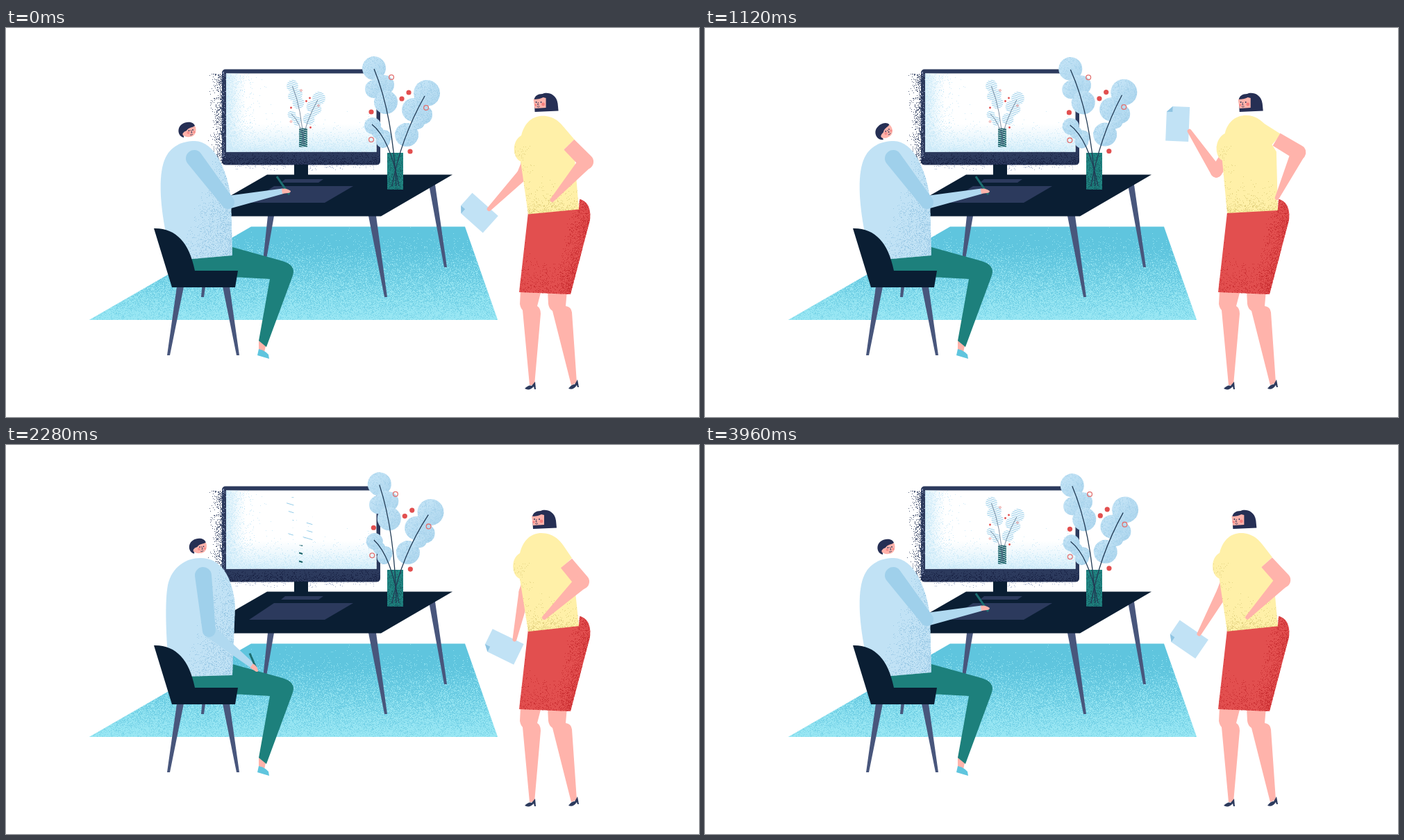
An HTML page with a canvas for the animation above (4000 ms loop, 998 by 561 pixels).

```html
<!DOCTYPE html>
<html lang="en">
<head>
<meta charset="utf-8">
<title>Studio</title>
<style>
html, body { margin: 0; width: 100%; height: 100%; overflow: hidden; background: #fff; }
canvas { display: block; }
</style>
</head>
<body>
<canvas id="stage" width="998" height="561"></canvas>
<script>
const LOOP = 4000;
const ctx = document.getElementById('stage').getContext('2d');
const INK = '#0a1e33', NAVY = '#2c3a5d', LEG = '#48567c', SKIN = '#ffb3ab', TEAL = '#1d807c',
      SKY = '#c1e2f5', SLEEVE = '#9fd0eb', RED = '#e24f4f', HAIR = '#262f54', RUG = '#5fc5de';

// ---------- helpers ----------
const lerp = (a, b, k) => a + (b - a) * k;
const clamp = v => Math.max(0, Math.min(1, v));
const polar = (p, deg, len) => {
  const a = deg * Math.PI / 180;
  return [p[0] + Math.cos(a) * len, p[1] + Math.sin(a) * len];
};
const mix = (a, b, k) => [lerp(a[0], b[0], k), lerp(a[1], b[1], k)];

// Eased value between [time, value] keys.
function keyed(t, ...keys) {
  if (t <= keys[0][0]) return keys[0][1];
  for (let i = 1; i < keys.length; i++) {
    const [t0, v0] = keys[i - 1], [t1, v1] = keys[i];
    if (t < t1) return lerp(v0, v1, (1 - Math.cos(Math.PI * (t - t0) / (t1 - t0))) / 2);
  }
  return keys[keys.length - 1][1];
}

const NUMBER = /-?\d+(\.\d+)?/g;
function morph(a, b, k) {
  const to = b.match(NUMBER);
  let i = 0;
  return new Path2D(a.replace(NUMBER, n => lerp(+n, +to[i++], k).toFixed(2)));
}

function fill(shape, color) {
  ctx.fillStyle = color;
  ctx.fill(typeof shape === 'string' ? new Path2D(shape) : shape);
}

function line(d, color, width) {
  ctx.strokeStyle = color;
  ctx.lineWidth = width;
  ctx.stroke(new Path2D(d));
}

function dot(x, y, r, color) {
  ctx.fillStyle = color;
  ctx.beginPath();
  ctx.arc(x, y, r, 0, 7);
  ctx.fill();
}

function gradient(x0, y0, x1, y1, from, to, begin = 0) {
  const g = ctx.createLinearGradient(x0, y0, x1, y1);
  g.addColorStop(begin, from);
  g.addColorStop(1, to);
  return g;
}

function limb(a, b, ra, rb, color, flatStart) {
  const ang = Math.atan2(b[1] - a[1], b[0] - a[0]), q = Math.PI / 2;
  ctx.beginPath();
  ctx.arc(b[0], b[1], rb, ang - q, ang + q);
  if (flatStart) {
    ctx.lineTo(a[0] + Math.cos(ang + q) * ra, a[1] + Math.sin(ang + q) * ra);
    ctx.lineTo(a[0] + Math.cos(ang - q) * ra, a[1] + Math.sin(ang - q) * ra);
  } else ctx.arc(a[0], a[1], ra, ang + q, ang + 3 * q);
  ctx.fillStyle = color;
  ctx.fill();
}

let seed = 7;
const random = () => (seed = (seed * 16807) % 2147483647) / 2147483647;

// Speckled layer; density receives 0..1 coordinates.
function grain(x, y, w, h, color, density) {
  const image = document.createElement('canvas');
  image.width = w;
  image.height = h;
  const g = image.getContext('2d');
  g.fillStyle = color;
  for (let j = 0; j < h; j++)
    for (let i = 0; i < w; i++)
      if (random() < density(i / w, j / h)) g.fillRect(i, j, 1, 1);
  return { image, x, y };
}

function shade(path, layer, dx = 0) {
  ctx.save();
  ctx.clip(path);
  ctx.drawImage(layer.image, layer.x + dx, layer.y);
  ctx.restore();
}

const grains = {
  rug: grain(120, 286, 590, 136, '#a6eef8b0', (x, y) => .85 * Math.pow(y, 1.7)),
  shirt: grain(215, 160, 122, 180, '#9ccae6', (x, y) => .7 * Math.max(0, x - .5 + (y - .45) * .5)),
  blouse: grain(725, 124, 110, 148, '#dcc976c0', (x, y) => .5 * Math.pow(y, 9) + .3 * clamp(.33 - x) * (y > .3)),
  skirt: grain(738, 245, 106, 140, '#c5282cc0', (x, y) =>
    .9 * clamp((x + y * .25 - .72) * 2) + .5 * clamp(y - .6) + .4 * clamp(.16 - x)),
  shadow: grain(284, 66, 28, 130, '#2c3a5dd0', (x, y) => .6 * Math.pow(x, 3)),
  under: grain(330, 197, 200, 9, '#a3afcb', (x, y) => .12 * (1 - y)),
  chin: grain(311, 179, 228, 18, '#1a2446', (x, y) => .45 * y),
  bezel: grain(311, 60, 6, 130, '#8e9abb', x => .2 * (1 - x)),
  screen: grain(317, 66, 217, 113, '#cdeaf8', (x, y) =>
    clamp(.6 * Math.pow(1 - x, 16) + .6 * Math.pow(y, 8))),
  leaf: grain(505, 35, 125, 140, '#9ccbe7b0', (x, y) => .14 + .2 * y),
  vase: grain(549, 180, 24, 54, '#176468', (x, y) => .35 * y + .15)
};

// ---------- plant ----------
const branches = [
  [[545, 82, 14], [530, 88, 13], [547, 107, 17], [530, 58, 17], [538, 78, 11]],
  [[600, 125, 14], [587, 118, 17], [577, 154, 17], [606, 94, 19], [593, 136, 10]],
  [[545, 157, 10], [535, 150, 9], [543, 163, 10], [528, 141, 12]]
];
const stems = [[530, 59, 557, 125, 562, 228], [603, 98, 568, 160, 556, 228], [527, 139, 553, 160, 566, 228]];
const berries = [[526, 121], [570, 102], [580, 93], [582, 178]];
const rings = [[555, 71], [605, 115], [526, 161]];

function union(circles) {
  const path = new Path2D();
  for (const [x, y, r] of circles) {
    path.moveTo(x + r, y);
    path.arc(x, y, r, 0, 7);
  }
  return path;
}
const leaves = branches.map(union);

function turn(x, y, a) {
  const dx = x - 561, dy = y - 185, c = Math.cos(a), s = Math.sin(a);
  return [561 + dx * c - dy * s, 185 + dx * s + dy * c];
}

function drawStems(a, color, width) {
  for (const [x, y, cx, cy, bx, by] of stems)
    line(`M${turn(x, y, a)}Q${turn(cx, cy, a * .8)} ${bx},${by}`, color, width);
}

function drawBerries(a, size) {
  for (const [x, y] of berries) dot(...turn(x, y, a), 3.6 * size, RED);
  ctx.strokeStyle = '#e2706f';
  ctx.lineWidth = 1.3;
  for (const [x, y] of rings) {
    ctx.beginPath();
    ctx.arc(...turn(x, y, a), 3.4 * size, 0, 7);
    ctx.stroke();
  }
}

function drawPlant(a) {
  const vase = new Path2D('M549 180H572V233H549Z');
  fill(vase, '#208481');
  shade(vase, grains.vase);
  ctx.save();
  ctx.translate(561, 185);
  ctx.rotate(a);
  ctx.translate(-561, -185);
  branches.forEach((circles, i) => {
    for (const [x, y, r] of circles)
      dot(x, y, r, gradient(x - r, y - r, x + r, y + r, SKY, '#acd5ed', .3));
    shade(leaves[i], grains.leaf);
  });
  ctx.restore();
  drawStems(a, '#223b55', 1.3);
  drawBerries(a * .85, 1);
}

// Hatched copy of the plant on the monitor.
const vaseArea = new Path2D('M549 180H573V234H549Z');
const hatches = [
  [leaves[0], 510, 566, 30, 128, '#92cbe8', 5.5, 2],
  [leaves[1], 558, 628, 62, 174, '#92cbe8', 5.5, 2],
  [leaves[2], 514, 558, 118, 176, '#92cbe8', 5.5, 2],
  [vaseArea, 549, 573, 172, 234, '#176066', 6, 4]
];

function drawSketch(shown, erasing) {
  if (shown <= 0) return;
  ctx.save();
  ctx.translate(147.5, 54.5);
  ctx.scale(.5, .5);
  for (const [area, x0, x1, y0, y1, color, gap, width] of hatches) {
    ctx.save();
    ctx.clip(area);
    for (let y = y0, i = 0; y < y1; y += gap, i++) {
      const order = erasing ? (i * 3 + 1) % 4 / 3 : clamp((y - 40) / 190);
      const k = clamp(shown * 3 - order * 2);
      if (k > 0) line(`M${x0} ${y}L${lerp(x0, x1, k)} ${y + (x1 - x0) * k * .3}`, color, width);
    }
    ctx.restore();
  }
  const detail = clamp(shown * 2 - 1);
  if (detail > 0) {
    ctx.globalAlpha = detail;
    drawStems(0, '#48607c', 1.4);
    drawBerries(0, detail * .8);
  }
  ctx.restore();
}

// ---------- room ----------
function drawRoom(shown, erasing) {
  const rug = new Path2D('M353 286.6H661L708 421H120Z');
  fill(rug, gradient(0, 320, 0, 421, RUG, '#7cd6e9'));
  shade(rug, grains.rug);
  for (const g of [grains.shadow, grains.under]) ctx.drawImage(g.image, g.x, g.y);
  const frame = new Path2D();
  frame.roundRect(311, 59.5, 228, 138, 5);
  fill(frame, NAVY);
  shade(frame, grains.chin);
  shade(frame, grains.bezel);
  const screen = new Path2D('M317 65.6H533.5V178.6H317Z');
  fill(screen, '#fff');
  fill(screen, gradient(0, 138, 0, 178, '#d9f0fb00', '#d9f0fb'));
  fill(screen, gradient(317, 0, 345, 0, '#dcf1fb', '#dcf1fb00'));
  shade(screen, grains.screen);
  drawSketch(shown, erasing);
  fill('M377 271H386L373 345H369ZM609 226H618L635 345H631ZM522 271H533L549 388H545ZM283 366H288L285 388H281Z', LEG);
  fill('M376 211.4H643L540 271.6H272Z', INK);
  fill('M415 197H435V214H415Z', INK);
  fill('M402 218H457L450 223H396ZM386 228H500L459 252H350Z', NAVY);
}

// ---------- seated man ----------
function drawManHead(x, y, angle) {
  ctx.save();
  ctx.translate(x, y);
  ctx.rotate(angle);
  fill('M-7 -4C-3 -10 9 -10 12 -4C14 4 10 10 3 10C-2 11 -7 8 -7 2Z', SKIN);
  fill('M-5 11C-14 9 -15 -3 -8 -8C-1 -13 9 -12 11 -6C7 -3 2 -4 -1 1L-5 3Z', HAIR);
  dot(-4, 6, 2.6, SKIN);
  dot(1.5, 4, 2, '#f58d8b');
  dot(10, 3, 1.6, '#f58d8b');
  dot(2.5, 1, .9, HAIR);
  dot(8, 0, .9, HAIR);
  line('M5 0L7 4H5M4 7Q6 8 8 6', HAIR, .8);
  ctx.restore();
}

function drawMan(rest, look, lean, scribble) {
  fill('M364 451L374 458L372 468L364 466Z', SKIN);
  fill('M364 463Q373 465 378 471L379 477L362 472Z', RUG);
  fill('M262 330L326 316L398 336Q418 342 413 357L375 460L364 451L380 362L272 356Z', TEAL);
  const shirt = morph(
    'M232 305C222 258 219 215 228 191C236 170 254 163 272 163C300 164 318 202 324 246L326 328L258 334Z',
    'M233 305C230 262 229 225 233 202C239 175 260 163 280 163C309 163 326 188 330 232L326 332L258 334Z', rest);
  fill(shirt, SKY);
  shade(shirt, grains.shirt, Math.round(rest * 4));
  fill('M246 373H256L236 472H232ZM312 373H322L336 472H332Z', LEG);
  fill('M213 289C244 288 264 309 272 350H334L330 374H239Z', INK);

  const shoulder = mix([271, 188], [284, 188], rest);
  const elbow = polar(shoulder, lerp(52.6, 84, rest), 80);
  const foreAngle = lerp(-11.6, 39, rest) + scribble;
  const wrist = polar(elbow, foreAngle, 79 + scribble * 5);
  const [hx, hy] = polar(wrist, foreAngle + 6, 6);
  limb(elbow, wrist, 9.5, 4, '#b0d9f0');
  limb(shoulder, elbow, 12, 9.5, SLEEVE);
  line(`M${hx + lerp(-13, -7, rest) + scribble * 6} ${hy - 21}L${hx + lerp(5, 2, rest)} ${hy + lerp(5, 0, rest)}`, '#1c6e70', 3);
  ctx.save();
  ctx.translate(hx, hy);
  ctx.rotate(lerp(0, .7, rest));
  fill('M-6 -3Q0 -5 7 0Q7 3 3 3L-5 4Z', SKIN);
  ctx.restore();
  drawManHead(261 + lean * 15.5 - look * 3.5, 147 - lean + look * 2, -.38 * look + lean * .04);
}

// ---------- standing woman ----------
function drawWomanHead(x) {
  ctx.save();
  ctx.translate(x, 107);
  fill('M-15 14L-16 -4C-15 -9 -11 -12 -4 -12C2 -15 16 -13 18 2L19 12.5Z', HAIR);
  fill('M-17 -4Q-8 -4 -3 -7L1 -6V8L-15 9Z', SKIN);
  dot(-3, 3, 2.4, '#f5807f');
  dot(-14, 4, 1.6, '#f5807f');
  dot(-13, 0, .9, HAIR);
  dot(-6, 0, .9, HAIR);
  line('M-10 0L-11 4H-9M-12 6Q-10 8 -8 6', HAIR, .8);
  ctx.restore();
}

function drawPaper(x, y, angle) {
  ctx.save();
  ctx.translate(x, y);
  ctx.rotate(angle * Math.PI / 180);
  fill('M-8 -25H16.5V25H-16.5V-17Z', SKY);
  fill('M-8 -25V-17H-16.5Z', '#8fc4e2');
  ctx.restore();
}

function drawWoman(lift) {
  const farElbow = mix([747, 212], [736, 207], lift);
  const farHand = polar(farElbow, lerp(102, 240, lift), 70);
  drawPaper(farHand[0] + lerp(-16.5, -17, lift), farHand[1] + lerp(10.5, -11, lift), lerp(-64, 4, lift));
  limb([762, 168], farElbow, 9, 8.5, SKIN);
  limb(farElbow, farHand, 8.5, 3, SKIN);

  fill('M741 378L740 398Q741 404 744 407L754 515H761L770 412Q770 404 765 401L771 378Z', SKIN);
  fill('M780 378L781 398Q782 405 787 408L814 515L822 512L815 410Q814 402 806 401L808 378Z', SKIN);
  fill('M747 520Q753 514 757 516L762 510L763 521H761L760 517Q754 524 747 520Z', NAVY);
  fill('M810 520Q815 513 819 514L823 507L825 518H823L822 515Q817 523 810 520Z', NAVY);
  const skirt = new Path2D('M752 266L825 259L826 247C838 249 843 262 841 277L813 384L739 381Z');
  fill(skirt, RED);
  shade(skirt, grains.skirt);

  const blouse = morph(
    'M752 269L740 193C728 188 726 164 740 156C745 136 757 127 771 127C788 127 798 138 802 144L815 163L799 178L817 183L825 261Z',
    'M752 267L745 191C734 186 733 160 749 152C753 134 766 126 779 126C794 126 801 134 806 138L830 153L817 168L823 178L825 263Z', lift);
  fill(blouse, '#fff0a8');
  shade(blouse, grains.blouse, Math.round(lift * 4));

  const cuff = mix([807, 170.5], [823.5, 160.5], lift);
  const elbow = mix([829, 197], [855, 179], lift);
  const hand = mix([775, 249], [825, 245], lift);
  limb(cuff, elbow, 10.5, 11, SKIN, true);
  limb(elbow, hand, 10.5, 3, SKIN);
  drawWomanHead(lerp(774, 785, lift));
}

// ---------- timeline ----------
function render(t) {
  ctx.fillStyle = '#fff';
  ctx.fillRect(0, 0, 998, 561);
  const lift = keyed(t, [-140, 0], [300, 1], [1060, 1], [1660, 0], [3860, 0], [4300, 1]);
  const rest = keyed(t, [1560, 0], [2160, 1], [2380, 1], [2900, 0]);
  const lean = keyed(t, [1720, 0], [2220, 1], [2380, 1], [2900, 0]);
  const look = keyed(t, [320, 0], [680, 1.15], [1120, 1], [2000, 0]);
  const erasing = t < 2600;
  const shown = erasing ? 1 - clamp((t - 1800) / 560) : clamp((t - 3220) / 700);
  const scribble = t > 3180 && t < 3960
    ? Math.sin((t - 3180) / 780 * Math.PI) * Math.sin((t - 3180) / 90) : 0;
  const sway = .079 * Math.sin(t / 1000 * Math.PI);
  drawRoom(shown, erasing);
  drawPlant(sway);
  drawMan(rest, look, lean, scribble);
  drawWoman(lift);
}

const start = performance.now();
function tick() {
  render((performance.now() - start) % LOOP);
  requestAnimationFrame(tick);
}
tick();
</script>
</body>
</html>
```
